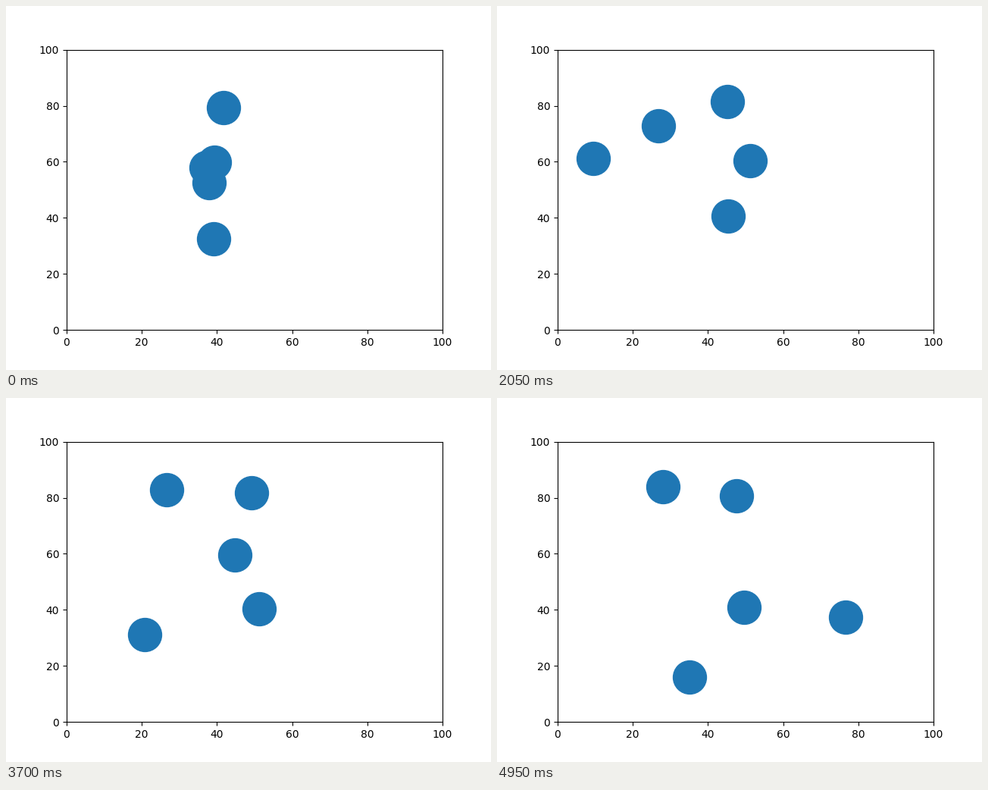
A matplotlib script for the animation above (5 s loop, 640 px wide and 480 px high).

```python
import numpy as np
import matplotlib.pyplot as plt
from matplotlib.animation import FuncAnimation

FRAMES = 100
INTERVAL = 50
PAUSE_AT, PAUSE_LEN = 63, 2  # the whole swarm rests briefly here

# Each agent drifts through a few waypoints, reached at shared steps.
STEPS = np.array([0, 24, 41, 54, 64, 81, 97])
AGENTS = np.array([
    [(41.7, 79.3), (45.4, 82.0), (45.2, 81.5), (46.6, 80.4), (47.8, 81.8), (50.2, 81.2), (47.6, 80.7)],
    [(37.1, 58.0), (13.9, 60.9), (9.5, 61.2), (10.5, 48.5), (17.9, 39.0), (23.8, 23.3), (35.1, 16.0)],
    [(39.3, 59.8), (32.3, 65.5), (26.8, 72.8), (27.0, 78.2), (27.8, 81.2), (25.2, 83.7), (28.0, 83.9)],
    [(37.9, 52.5), (46.6, 59.0), (51.2, 60.4), (48.8, 60.7), (46.6, 59.8), (43.8, 57.4), (49.6, 40.9)],
    [(39.1, 32.5), (43.1, 38.2), (45.4, 40.6), (46.0, 40.1), (46.2, 39.6), (59.7, 41.2), (76.6, 37.4)],
])
VELOCITY = np.gradient(AGENTS, STEPS, axis=1)


def positions(frame):
    """Hermite spline through the waypoints of all agents at once."""
    step = frame - np.clip(frame - PAUSE_AT, 0, PAUSE_LEN)
    i = min(np.searchsorted(STEPS, step, side="right") - 1, len(STEPS) - 2)
    span = STEPS[i + 1] - STEPS[i]
    u = (step - STEPS[i]) / span
    ease = u * u * (3 - 2 * u)
    return ((1 - ease) * AGENTS[:, i] + ease * AGENTS[:, i + 1]
            + span * u * (1 - u) ** 2 * VELOCITY[:, i]
            - span * u * u * (1 - u) * VELOCITY[:, i + 1])


fig, ax = plt.subplots(figsize=(6.4, 4.8), dpi=100)
ax.set_xlim(0, 100)
ax.set_ylim(0, 100)
dots = ax.scatter(*positions(0).T, s=1000)


def update(frame):
    dots.set_offsets(positions(frame))
    return (dots,)


anim = FuncAnimation(fig, update, frames=FRAMES, interval=INTERVAL,
                     repeat=True, repeat_delay=0)
plt.show()
```
